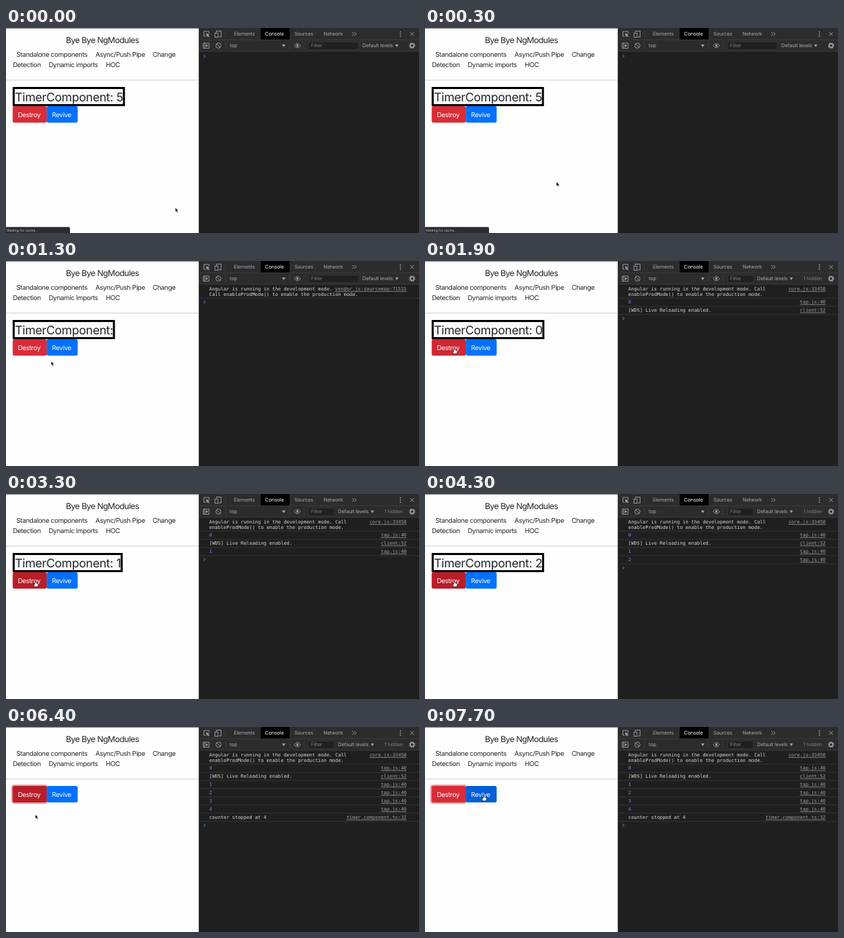
These frames come from a looping animation (600 px wide and 299 px high, 8 s). An HTML page:

```html
<!DOCTYPE html>
<html lang="en">
<head>
<meta charset="utf-8">
<title>Timer component</title>
<style>
  html, body { margin: 0; width: 100%; height: 100%; overflow: hidden; background: #fefefe; }
  svg { display: block; width: 600px; height: 299px; }
  text { white-space: pre; text-rendering: geometricPrecision; }
  #page text { font: 9.6px Inter, sans-serif; letter-spacing: -.034em; fill: #212529; }
  #page .title { font-size: 12.1px; letter-spacing: -.045em; text-anchor: middle; }
  #page .timer { font-size: 17.3px; letter-spacing: -.018em; }
  #page .btn { fill: #fff; }
  #status text { font: 5px Inter, sans-serif; fill: #c4c4c8; }
  #tools text { font: 7.3px Inter, sans-serif; letter-spacing: -.02em; fill: #a6a9ad; }
  #tools .on { fill: #fff; }
  #tools .dim { fill: #7d7d7d; }
  #tools .icon { fill: none; stroke: #a0a3a7; stroke-width: .9; }
  #tools .solid { fill: #a0a3a7; }
  #tools .rule { stroke: #444; stroke-width: .7; }
  #log text { font: 6.92px "DejaVu Sans Mono", monospace; fill: #d6d6d6; }
  #log .num { fill: #8f7cf5; }
  #log .link { fill: #a3a3a3; text-anchor: end; text-decoration: underline; text-decoration-thickness: .6px; }
  #log line { stroke: #3a3a3a; stroke-width: .8; }
</style>
</head>
<body>
<svg viewBox="0 0 600 299">
  <rect width="600" height="299" fill="#fefefe"/>
  <rect width="281" height="1" fill="#858585"/>

  <g id="page">
    <text class="title" x="140" y="22.4">Bye Bye NgModules</text>
    <text x="15" y="41.6">Standalone components</text>
    <text x="130" y="41.6">Async/Push Pipe</text>
    <text x="213" y="41.6">Change</text>
    <text x="10" y="56.7">Detection</text>
    <text x="62" y="56.7">Dynamic imports</text>
    <text x="145" y="56.7">HOC</text>
    <rect y="75.5" width="280" height="1" fill="#d2d2d2"/>
    <g id="timer">
      <rect id="frame" x="11.2" y="87.5" height="25" fill="#fafafa" stroke="#000" stroke-width="3"/>
      <text id="count" class="timer" x="13" y="106.8"></text>
    </g>
    <g id="buttons">
      <rect id="ring" x="7.7" y="-2" width="53.3" height="28" rx="4.2" fill="#dc3545"/>
      <rect id="destroy" x="9.7" width="49.4" height="24" rx="2.5"/>
      <text class="btn" x="17.2" y="15.6">Destroy</text>
      <rect id="revive" x="59.1" width="45" height="24" rx="2.5"/>
      <text class="btn" x="66.8" y="15.6">Revive</text>
    </g>
  </g>

  <g id="status">
    <path d="M0 290.3H91a2 2 0 0 1 2 2V299H0Z" fill="#2b2b30"/>
    <text x="1" y="296.6">Waiting for cache...</text>
  </g>

  <g id="tools">
    <rect x="280" width="320" height="299" fill="#1f1f1f"/>
    <rect x="280" width="320" height="34" fill="#2c2c2c"/>
    <rect x="370" width="42" height="17" fill="#000"/>
    <path class="rule" d="M280 17.2H600M280 34H600M280.4 0V299M319 4V14M319 20V31M412 20V31M433 20V31"/>
    <path class="icon" d="M290 12H287.5V5H295V8"/>
    <path class="solid" d="M290.5 7.5l5.5 2.3-2.3.8 2 2-.8.8-2-2-.9 2Z"/>
    <path class="icon" d="M305.5 6.5V4.5H312.5V13H309"/>
    <rect class="icon" x="303.6" y="7.3" width="4.3" height="6.2"/>
    <text x="331" y="11.3">Elements</text>
    <text class="on" x="376.3" y="11.3">Console</text>
    <text x="419" y="11.3">Sources</text>
    <text x="461.3" y="11.3">Network</text>
    <path class="icon" d="M503 6l2.5 2.7-2.5 2.7M506.3 6l2.5 2.7-2.5 2.7"/>
    <g class="solid">
      <circle cx="573" cy="5.7" r=".9"/><circle cx="573" cy="8.8" r=".9"/><circle cx="573" cy="11.9" r=".9"/>
    </g>
    <path class="icon" d="M587.3 6l5.4 5.4M592.7 6l-5.4 5.4"/>

    <path class="icon" d="M286.5 22H295V29.5H286.5ZM288.6 22V29.5"/>
    <path class="solid" d="M290.3 23.6L293.8 25.8 290.3 28Z"/>
    <circle class="icon" cx="308.6" cy="25.7" r="3.7"/>
    <path class="icon" d="M306 23.1l5.2 5.2"/>
    <text x="325" y="28">top</text>
    <path class="solid" d="M401 24h5l-2.5 4Z"/>
    <path class="icon" d="M418.7 25.7Q423.3 19.5 427.9 25.7Q423.3 31.9 418.7 25.7Z"/>
    <circle class="solid" cx="423.3" cy="25.7" r="1.6"/>
    <rect id="filter" x="440" y="20.3" height="11" fill="#202020" stroke="#3b3b3b" stroke-width=".7"/>
    <text class="dim" x="443" y="28.2">Filter</text>
    <g id="levels">
      <text x="0" y="28">Default levels</text>
      <path class="solid" d="M47.6 24h4.6l-2.3 4Z"/>
    </g>
    <text id="hidden" class="dim" x="549.5" y="28">1 hidden</text>
    <circle class="icon" cx="590" cy="25.7" r="2.6" style="stroke-width:1.5"/>
    <circle class="icon" cx="590" cy="25.7" r="3.9" style="stroke-width:1.2" stroke-dasharray="1.53"/>
  </g>

  <g id="log"></g>
  <path id="prompt" d="M287-2l2.5 2-2.5 2" fill="none" stroke="#3f86e8" stroke-width="1"/>

  <g id="pointer" stroke="#fff" stroke-width=".6" stroke-linejoin="round">
    <path id="arrow" d="M0 0V6.4L1.5 5.1 2.5 7.5 3.7 7 2.7 4.7H4.6Z" fill="#000"/>
    <path id="hand" d="M-.7-.5Q0-1.3.7-.5V2.2Q1.5 1.8 2 2.5 2.8 2.2 3.2 2.9 4.2 2.7 4.3 3.7V5.5L3.5 7.8H-.6L-2.6 4.8Q-2.5 3.6-1.5 4.1L-.7 4.8Z"
          fill="#fff" stroke="#000"/>
  </g>
</svg>

<script>
const LOOP = 8000, STEP = 100, FADE = 150;
const BLANK = 400, READY = 1200, MAPPED = 1500, PRESS = 6300, GONE = 6400, OVER = 7500;
const TICKS = [1400, 2400, 3400, 4400, 5400];
const RED = [217, 44, 56], DARK_RED = [186, 29, 40];
const BLUE = [0, 112, 255], DARK_BLUE = [0, 95, 216];

// time, x, y of the pointer tip
const PATH = [
  [0, 246, 262], [800, 72, 143], [1300, 65.5, 146], [1800, 42.5, 127.5],
  [7000, 42.5, 127.5], [7700, 85, 100]
];

// time, text, link
const ROWS = [
  [TICKS[0], 0, 'tap.js:40'],
  [1600, '[WDS] Live Reloading enabled.', 'client:52'],
  ...TICKS.slice(1).map((t, i) => [t, i + 1, 'tap.js:40']),
  [GONE, 'counter stopped at 4', 'timer.component.ts:32']
];

const $ = id => document.getElementById(id);
const show = (id, on) => $(id).style.display = on ? '' : 'none';
const set = (id, name, value) => $(id).setAttribute(name, value);
const fade = (t, from) => Math.min(1, Math.max(0, (t - from) / FADE));
const mix = (a, b, k) => `rgb(${a.map((v, i) => Math.round(v + (b[i] - v) * k))})`;
const ease = k => k * k * (3 - 2 * k);

function pointerAt(t) {
  const i = PATH.findIndex(p => p[0] > t);
  if (i < 0) return PATH[PATH.length - 1].slice(1);
  const [t0, x0, y0] = PATH[i - 1], [t1, x1, y1] = PATH[i];
  const k = ease((t - t0) / (t1 - t0));
  return [x0 + (x1 - x0) * k, y0 + (y1 - y0) * k];
}

const line = (x, y, text, cls = '') => `<text x="${x}" y="${y}" class="${cls}">${text}</text>`;
const rule = y => `<line x1="281" x2="600" y1="${y}" y2="${y}"/>`;

function drawLog(t) {
  if (t < READY) {
    $('log').innerHTML = '';
    set('prompt', 'transform', 'translate(0 41)');
    return;
  }
  const mapped = t >= MAPPED;
  const start = 'Angular is running in the development mode.';
  const end = 'enableProdMode() to enable the production mode.';
  let out = line(295.3, 43.2, mapped ? start + ' Call' : start)
    + line(295.3, 50.6, mapped ? end : 'Call ' + end)
    + line(582, 43.2, mapped ? 'core.js:33458' : 'vendor.js:sourcemap:71515', 'link')
    + rule(54.2);
  const rows = ROWS.filter(r => r[0] <= t);
  rows.forEach(([, text, link], i) => {
    const y = 62.4 + 11.93 * i;
    out += line(295.3, y, text, typeof text === 'number' ? 'num' : '')
      + line(582, y, link, 'link') + rule(y + 3.7);
  });
  $('log').innerHTML = out;
  set('prompt', 'transform', `translate(0 ${59.9 + 11.93 * rows.length})`);
}

function drawPage(t) {
  show('status', t < BLANK);
  show('page', t < BLANK || t >= READY);
  show('timer', t < GONE);

  const ticks = TICKS.filter(at => at <= t).length;
  const count = t < BLANK ? ' 5' : ticks ? ' ' + (ticks - 1) : '';
  $('count').textContent = 'TimerComponent:' + count;
  if (t < BLANK || t >= READY && t < GONE) {
    set('frame', 'width', $('count').getComputedTextLength() + 3);
  }

  set('buttons', 'transform', `translate(0 ${t < GONE ? 114 : 86})`);
  set('ring', 'opacity', .5 * fade(t, PRESS - 50));
  const hover = t < GONE ? fade(t, 1850) : 1 - fade(t, GONE);
  set('destroy', 'fill', mix(RED, DARK_RED, hover));
  set('revive', 'fill', mix(BLUE, DARK_BLUE, fade(t, OVER - 50)));
}

function drawTools(t) {
  const mapped = t >= MAPPED;
  show('hidden', mapped);
  set('filter', 'width', mapped ? 37 : 72);
  set('levels', 'transform', `translate(${mapped ? 482.3 : 517.8} 0)`);
}

function drawPointer(t) {
  const hand = t >= 1800 && t < GONE || t >= OVER;
  show('hand', hand);
  show('arrow', !hand);
  set('pointer', 'transform', `translate(${pointerAt(t)})`);
}

let last = -1;
const began = performance.now();
function render() {
  const t = Math.floor((performance.now() - began) % LOOP / STEP) * STEP;
  if (t !== last) {
    last = t;
    [drawPage, drawTools, drawLog, drawPointer].forEach(draw => draw(t));
  }
  requestAnimationFrame(render);
}
render();
</script>
</body>
</html>
```
